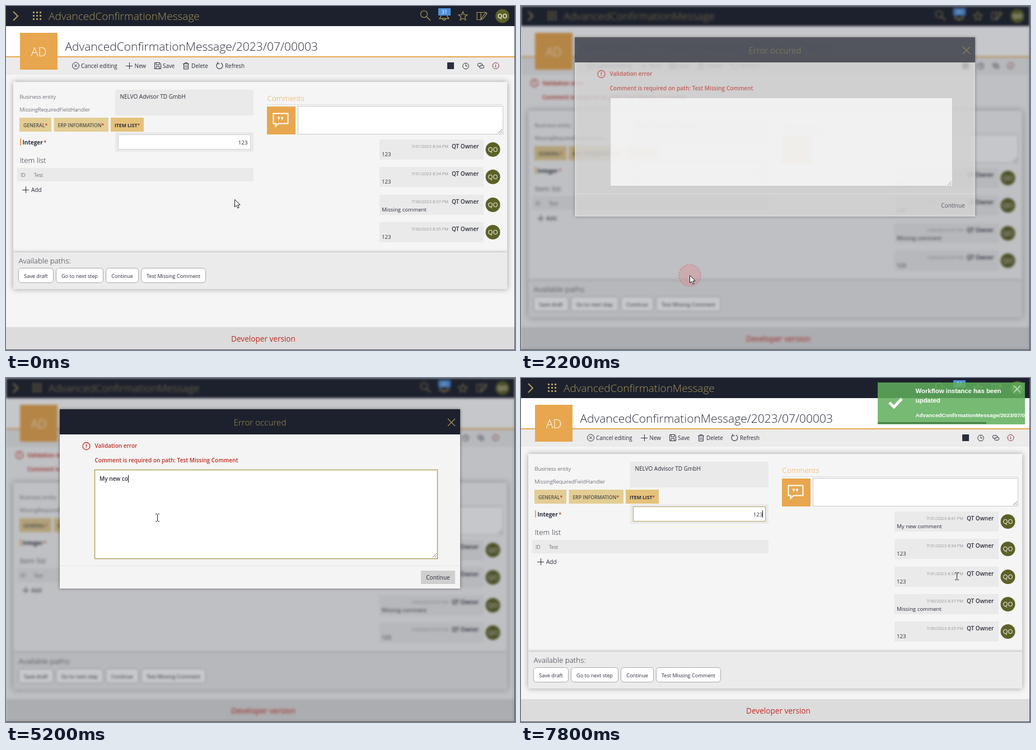
An HTML page with a canvas for the animation above (8 s loop, 909 by 616 pixels).

```html
<!DOCTYPE html>
<html lang="en">
<head>
<meta charset="utf-8">
<title>Confirmation message</title>
<style>
html, body { margin: 0; width: 100%; height: 100%; overflow: hidden; background: #f5f5f5; }
canvas { display: block; }
</style>
</head>
<body>
<canvas id="stage" width="909" height="616"></canvas>
<script>
const W = 909, H = 616, LOOP = 8000, STEP = 200;
const GOLD = '#a8965a', ORANGE = '#e8a74e', INK = '#2a2d3c', RED = '#bf2c22';
const GREY = '#eaeaea', PAGE = '#f5f5f5', NAVY = '#1d212d', OLIVE = '#5c6127';
const SANS = '"Open Sans", "Noto Sans", sans-serif';
const ARIAL = '"Liberation Sans", Arial, sans-serif';
const USER = 'QT Owner', INITIALS = 'QO';
const TITLE = 'AdvancedConfirmationMessage';
const RECORD = TITLE + '/2023/07/00003';
const REQUIRED = 'Comment is required on path: Test Missing Comment';
const NOTE = 'My new comment';

const stage = document.getElementById('stage').getContext('2d');
let g = stage;

function text(s, x, y, size, color = INK, weight = 400, align = 'left', family = SANS) {
  g.font = `${weight} ${size}px ${family}`;
  g.fillStyle = color;
  g.textAlign = align;
  g.fillText(s, x, y);
}

function box(x, y, w, h, color) {
  g.fillStyle = color;
  g.fillRect(x, y, w, h);
}

function frame(x, y, w, h, fill, border, width = 1) {
  box(x, y, w, h, fill);
  g.strokeStyle = border;
  g.lineWidth = width;
  g.strokeRect(x + .5, y + .5, w - 1, h - 1);
}

function disc(x, y, r, color) {
  g.fillStyle = color;
  g.beginPath();
  g.arc(x, y, r, 0, 7);
  g.fill();
}

function ring(x, y, r, color, width = 1) {
  g.strokeStyle = color;
  g.lineWidth = width;
  g.beginPath();
  g.arc(x, y, r, 0, 7);
  g.stroke();
}

function stroke(path, color = INK, width = 1) {
  g.strokeStyle = color;
  g.lineWidth = width;
  g.stroke(new Path2D(path));
}

function shadowed(blur, color, draw) {
  g.save();
  g.shadowBlur = blur;
  g.shadowColor = color;
  draw();
  g.restore();
}

function avatar(x, y, r, size, weight) {
  disc(x, y, r, OLIVE);
  text(INITIALS, x, y + size * .36, size, '#fff', weight, 'center');
}

function alertIcon(x, y) {
  ring(x, y, 6.5, RED, 1.3);
  box(x - .7, y - 3.5, 1.4, 4.5, RED);
  box(x - .7, y + 2, 1.4, 1.5, RED);
}

function grip(x, y) {
  stroke(`M${x - 7} ${y}l7 -7M${x - 3} ${y}l3 -3`, '#777');
}

function drawHeader() {
  box(0, 0, W, 36, NAVY);
  stroke('M13 10l8 8-8 8', '#b5a05a', 2);
  for (let i = 0; i < 9; i++) box(48 + i % 3 * 6, 10 + Math.floor(i / 3) * 6, 3, 3, '#b5a05a');
  text(TITLE, 76, 24.5, 19, GOLD, 300);
  ring(746.5, 14.5, 6, GOLD, 1.2);
  stroke('M751 19l7 7', GOLD, 1.4);
  stroke('M774 22.5h17l-3 -4v-6h-11v6zM780 23a2.5 2.5 0 0 0 5 0', GOLD, 1.3);
  box(772, 4, 22, 13, '#4f90dc');
  text('31', 783, 14, 9, '#fff', 400, 'center');
  let star = '';
  for (let i = 0; i < 10; i++) {
    const r = i % 2 ? 3.6 : 8.3, a = i * Math.PI / 5;
    star += `${i ? 'L' : 'M'}${816 + r * Math.sin(a)} ${18.5 - r * Math.cos(a)}`;
  }
  stroke(star + 'Z', GOLD, 1.2);
  stroke('M853 11.5h-12v13h7v-13M848 24.5l2 -4 7 -9 2 2 -7 9zM841 11.5h17', GOLD, 1.2);
  avatar(886.5, 18, 12.5, 11, 600);
}

function drawToolbar() {
  box(0, 36, W, 54, '#fff');
  box(0, 90, W, 33, '#ebebeb');
  box(0, 90, W, 2, ORANGE);
  box(25, 48, 67, 66, ORANGE);
  text('AD', 58.5, 90, 21.5, '#fff', 300, 'center');
  text(RECORD, 105.5, 80, 21, INK, 300);
  ring(124.5, 107, 6, INK);
  stroke('M122 104.5l5 5m0 -5l-5 5');
  stroke('M214 107.5h12M220.500 101v12');
  stroke('M265.500 101.500h9l2 2v9h-11zM268 101.500v4h6v-4M268 112.500v-4h6v4');
  stroke('M316 103.500h11M319.500 103v-1.500h4v1.500M317.500 104v9h8v-9M320 106v5M323 106v5');
  stroke('M378 102.500a5.500 5.500 0 1 0 6 -.5M378 100v3.500h3.500', INK, 1.1);
  const labels = [['Cancel editing', 134], ['New', 229.5], ['Save', 280], ['Delete', 331], ['Refresh', 391]];
  for (const [label, x] of labels) text(label, x, 111, 9.9);
  box(788, 101, 12, 12, INK);
  ring(821, 107.5, 5.3, INK);
  stroke('M821 104v3.500h3');
  stroke('M849 108h-4a2.700 2.700 0 0 1 0 -5.400h3a2.700 2.700 0 0 1 2.500 3.700M847 106h4a2.700 2.700 0 0 1 0 5.400h-3a2.700 2.700 0 0 1 -2.500 -3.700');
  ring(874.5, 107, 5.5, '#8a2b35');
  box(874, 106, 1, 4, '#8a2b35');
  box(874, 104, 1, 1, '#8a2b35');
}

function drawTab(label, x, w, color, weight, ink) {
  box(x, 200, w, 25, color);
  text(label, x + 7, 217, 8.6, ink, weight);
  text('*', x + 7 + g.measureText(label).width, 217, 8.6, RED, 600);
}

function drawForm(updated) {
  text('Business entity', 24.5, 166, 9.6, INK, 300);
  text('MissingRequiredFieldHandler', 24.5, 189, 9.6, INK, 300);
  box(195, 150, 247, 46, GREY);
  text('NELVO Advisor TD GmbH', 203.5, 166, 10);
  drawTab('GENERAL', 24, 57, '#e3cd94', 600, '#50504a');
  drawTab('ERP INFORMATION', 85.5, 97.5, '#e3cd94', 600, '#50504a');
  drawTab('ITEM LIST', 187, 59, '#e5c27a', 700, INK);
  box(25, 237, 2, 13, ORANGE);
  text('Integer', 29.5, 248, 10, INK, 700);
  text('*', 67, 248, 10, RED);
  box(195, 226, 247, 35, GREY);
  frame(200, 230, 237, 27, '#fff', updated ? '#b5a05a' : '#cfcfcf');
  text('123', 431.5, 247.5, 9.8, INK, 400, 'right');
  if (updated) box(431, 237, 1, 13, '#111');
  text('Item list', 24.5, 281, 13.3, INK, 300);
  box(20, 290, 422, 24, GREY);
  text('ID', 26, 306, 8.9, INK, 300);
  text('Test', 50, 306, 8.9, INK, 300);
  stroke('M29 329.500h12M35.500 323v12');
  text('Add', 45, 333, 10);
}

function drawComments(updated) {
  text('Comments', 466.5, 170, 13.5, '#e9a852', 300);
  box(465, 176, 422, 1, '#dedede');
  box(466, 180, 51, 50, ORANGE);
  stroke('M477.500 192.500h26v18h-17l-5 5v-5h-4z', '#fff', 2);
  for (const x of [487, 493]) {
    disc(x, 200, 2, '#fff');
    stroke(`M${x + 1.5} 200q0 3 -2.500 4`, '#fff');
  }
  frame(521, 179, 367, 51, '#fff', '#c9c9c9');
  grip(886, 228);
  const list = [
    ['7/31/2023 8:34', '123'], ['7/31/2023 8:34', '123'],
    ['7/30/2023 8:37', 'Missing comment'], ['7/30/2023 8:35', '123']
  ];
  if (updated) list.unshift(['7/31/2023 8:41', NOTE]);
  list.forEach(([date, body], i) => {
    const y = Math.round(239 + i * 49.25);
    box(667, y, 186, 36, GREY);
    text(date + ' PM', 790, y + 15, 7.7, '#666', 300, 'right');
    text(USER, 796, y + 15.5, 10, INK, 600);
    text(body, 671, y + 30, 9.7);
    avatar(869.5, y + 18, 13, 11.5, 400);
  });
}

function drawPaths(y, focused) {
  shadowed(5, 'rgba(0,0,0,.4)', () => box(13, y, 882, 66, '#ebebeb'));
  text('Available paths:', 22.5, y + 20, 13.4, INK, 300);
  const buttons = [['Save draft', 22, 63], ['Go to next step', 89, 85], ['Continue', 178, 59], ['Test Missing Comment', 241, 116]];
  buttons.forEach(([label, x, w], i) => {
    const on = focused && i === 3;
    g.beginPath();
    g.roundRect(x + .5, y + 28.5, w - 1, 26, 5);
    g.fillStyle = '#fff';
    g.fill();
    g.strokeStyle = on ? '#a3914f' : '#a9a9a9';
    g.lineWidth = on ? 2 : 1;
    g.stroke();
    text(label, x + w / 2, y + 45.5, 9.15, INK, 400, 'center');
  });
}

function drawPage({ updated = false, failed = false, focused = false } = {}) {
  box(0, 0, W, H, PAGE);
  drawToolbar();
  if (failed) {
    alertIcon(24, 138);
    text('Validation error', 38, 141.5, 10, RED, 600);
    text(REQUIRED, 38, 166.5, 10, RED, 600);
  }
  g.save();
  g.translate(0, failed ? 51 : 0);
  const pathsTop = updated ? 490 : 441;
  shadowed(10, 'rgba(0,0,0,.35)', () => box(13, 136, 882, pathsTop - 70, PAGE));
  g.save();
  g.beginPath();
  g.rect(13, 136, 882, pathsTop - 70);
  g.clip();
  drawPaths(pathsTop, focused);
  g.restore();
  drawForm(updated);
  drawComments(updated);
  g.restore();
  drawHeader();
  box(0, 575, W, 41, '#dcdcdc');
  text('Developer version', 459.5, 600.5, 13.6, '#c5281f', 400, 'center');
  drawEdges();
}

function drawEdges() {
  box(908, 0, 1, H, '#55575c');
  box(0, 615, W, 1, '#55575c');
}

function drawLoader(t) {
  box(0, 36, 908, 539, 'rgba(245,245,245,.78)');
  for (let i = 0; i < 3; i++) {
    const phase = (t - 2000) / 1200 * 2 * Math.PI - i * 1.3;
    const r = 5 * Math.max(0, Math.cos(phase));
    if (r > .5) disc(439 + i * 14.5, 326, r, '#b09c56');
  }
}

let backdrop;
function makeBackdrop() {
  const sharp = new OffscreenCanvas(W, H), soft = new OffscreenCanvas(W, H);
  g = sharp.getContext('2d');
  drawPage({ failed: true });
  g = soft.getContext('2d');
  box(0, 0, W, H, '#fff');
  g.filter = 'blur(2px)';
  g.drawImage(sharp, 0, 0);
  g.filter = 'none';
  box(0, 0, W, H, 'rgba(29,33,45,.25)');
  drawEdges();
  g = stage;
  return soft;
}

const typed = [[4200, 1], [4400, 2], [4600, 4], [4800, 6], [5000, 7], [5200, 9], [5400, 11], [5600, 13], [5800, 14]];
const latest = (keys, t) => keys.filter(k => k[0] <= t).pop();

function drawDialog(t) {
  const editing = t >= 3400 && t < 7200;
  g.save();
  g.globalAlpha = t < 2400 ? .7 : 1;
  shadowed(5, 'rgba(0,0,0,.5)', () => box(96, 56, 715, 321, '#f4f4f4'));
  box(96, 56, 715, 45, NAVY);
  text('Error occured', 453.5, 85, 15.2, GOLD, 300, 'center');
  stroke('M789 73l13 13m0 -13l-13 13', GOLD, 1.2);
  alertIcon(143.5, 122);
  text('Validation error', 158.5, 125, 10, RED, 600);
  text(REQUIRED, 158.5, 151, 10, RED, 600);
  if (editing) frame(158, 164, 613, 160, '#fff', '#b0a05e', 1.5);
  else frame(159, 164, 612, 159, '#fff', '#b9b9b9');
  grip(769, 321);
  box(96, 336, 715, 1, '#e6e6e6');
  if (t >= 7200) frame(740, 344, 63, 26, '#cfcfcf', '#b5a05a');
  else box(741, 345, 61, 24, '#cfcfcf');
  text('Continue', 771.5, 361, 10, INK, 400, 'center');
  const key = latest(typed, t);
  const words = NOTE.slice(0, key ? key[1] : 0);
  text(words, 167, 184, 10, INK, 600);
  const caret = t === 3600 || t >= 4200 && t < 5800;
  if (caret) box(Math.round(167 + g.measureText(words).width), 174, 1, 13, '#111');
  g.restore();
}

function drawToast() {
  g.save();
  g.beginPath();
  g.rect(637, 8, 263, 75);
  g.clip();
  box(637, 8, 263, 75, 'rgba(96,174,92,.85)');
  box(637, 79, 194, 3, '#4b8148');
  stroke('M658 44l8 8 14 -15', '#fff', 5);
  text('Workflow instance has been', 704.5, 27, 11.4, '#fff', 700, 'left', ARIAL);
  text('updated', 704.5, 43.5, 11.4, '#fff', 700, 'left', ARIAL);
  text(RECORD, 704.5, 70, 9.8, '#fff', 700, 'left', ARIAL);
  stroke('M880 14l12 12m0 -12l-12 12', 'rgba(255,255,255,.7)', 1.3);
  g.restore();
}

function drawRipple(x, y, r, alpha) {
  g.save();
  g.globalAlpha = alpha;
  disc(x, y, r, '#e2848a');
  g.setLineDash([3, 2]);
  ring(x, y, r, '#b03038', 1.2);
  g.restore();
}

// Start time, x and y of each pointer position.
const pointer = [
  [0, 408, 346], [400, 430, 311], [600, 444, 289],
  [1200, 428, 311], [1400, 372, 387], [1600, 317, 462], [1800, 301, 482],
  [2600, 298, 458], [2800, 288, 384], [3000, 277, 302], [3200, 271, 256], [3400, 270, 250],
  [6400, 318, 260], [6600, 470, 292], [6800, 660, 331], [7000, 778, 355]
];

function drawPointer(t) {
  const [, x, y] = latest(pointer, t);
  const overNote = t >= 2600 && t < 7400 && x > 159 && x < 771 && y > 164 && y < 323;
  if (overNote || t >= 7800) {
    stroke(`M${x - 3} ${y - 6.5}h2.500l1 1 1 -1h2.500M${x + .5} ${y - 6}v12M${x - 3} ${y + 6.5}h2.500l1 -1 1 1h2.500`, '#222');
    return;
  }
  const arrow = new Path2D(`M${x + .5} ${y + .5}v13.500l3.200 -3 2.200 5 2.200 -1 -2.200 -4.800h4.300z`);
  g.fillStyle = '#fff';
  g.fill(arrow);
  g.strokeStyle = '#1a1a1a';
  g.lineWidth = 1;
  g.stroke(arrow);
}

function render(t) {
  if (t >= 2200 && t < 7400) {
    backdrop ||= makeBackdrop();
    g.drawImage(backdrop, 0, 0);
    drawDialog(t);
  } else {
    drawPage({ updated: t >= 7800, failed: t >= 7400 && t < 7800, focused: t >= 1800 && t < 2200 });
    if (t === 2000 || t === 7400 || t === 7600) drawLoader(t);
    if (t >= 7800) drawToast();
  }
  if (t === 2000) drawRipple(302, 482.5, 11, .8);
  if (t === 2200) drawRipple(301.5, 482.5, 19.5, .35);
  if (t === 3400) drawRipple(270, 250, 13, .65);
  if (t === 7200) drawRipple(778, 355, 11, .8);
  if (t === 7400) drawRipple(778, 355, 19.5, .35);
  drawPointer(t);
}

const start = performance.now();
function tick() {
  const elapsed = (performance.now() - start) % LOOP;
  render(Math.floor(elapsed / STEP) * STEP);
  requestAnimationFrame(tick);
}
tick();
</script>
</body>
</html>
```
